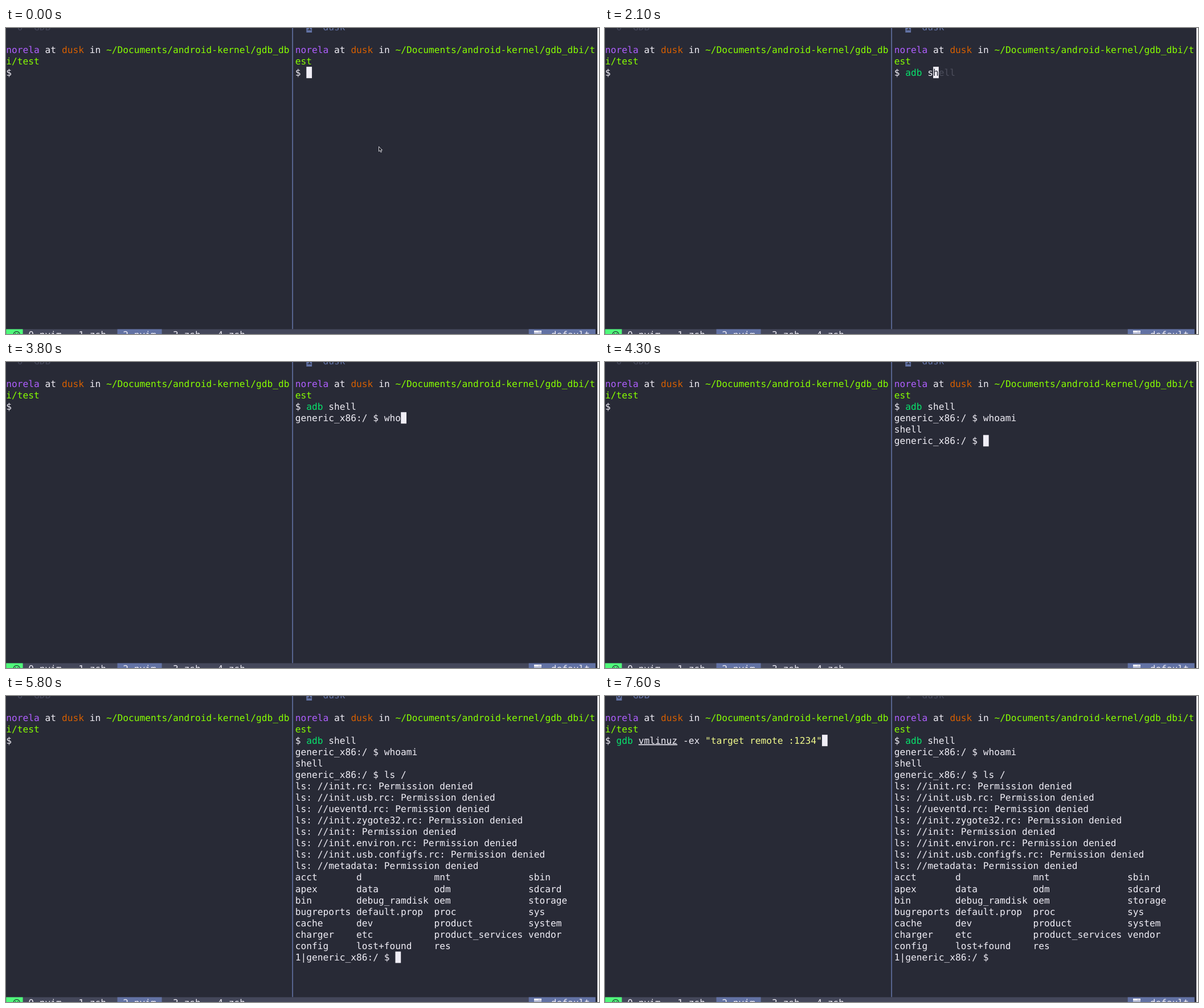
Recreate the animation shown at these times as an HTML page. Size 1041 px wide and 538 px high, loop 8 s.

```html
<!DOCTYPE html>
<html lang="en">
<head>
<meta charset="utf-8">
<title>Terminal session</title>
<style>
  html, body { margin: 0; width: 100%; height: 100%; overflow: hidden; background: #fff; }
  svg { position: absolute; left: 0; top: 0; }
  text {
    fill: #f0eef6; font: 16.21px "DejaVu Sans Mono", monospace; white-space: pre;
    text-rendering: geometricPrecision; font-variant-ligatures: none;
  }
  .user { fill: #af5fff; }
  .host { fill: #d75f00; }
  .path { fill: #87ff00; }
  .ok { fill: #08e36c; }
  .bad { fill: #ee4fb2; font-weight: bold; }
  .str { fill: #f1fa8c; }
  .file { text-decoration: underline; text-decoration-thickness: 1px; text-underline-offset: 2px; }
  .ghost { fill: #4d4f5d; }
  .cur, .num { fill: #282a36; }
  .on { fill: #6272a4; }
  .off { fill: #44475a; }
</style>
</head>
<body>
<svg width="1041" height="538">
  <path fill="#282a36" d="M0 0h1038.2v538H0z"/>
  <path fill="#6272a4" d="M502.3 0h1.6v529.5h-1.6z"/>
  <g id="bar"></g>
  <g fill="none" stroke="#282a36" stroke-width="1.1">
    <circle cx="18.7" cy="539.2" r="5.6"/>
    <path d="M16.6 536.5v2M20.8 536.5v2"/>
  </g>
  <path fill="#f0eef6" d="M927 532h13v4h-13zM927 537h13v1h-13z"/>
  <path fill="#6272a4" d="M935 533.4h1v1h-1zM937.3 533.4h1v1h-1z"/>
  <g id="panes"></g>
  <path id="mouse" d="M.5.5V9L2.5 7.2 4 10.5 5.4 9.8 4 6.7H6.6Z" fill="#17181f" stroke="#e4e4ea" stroke-width=".9"/>
</svg>
<script>
const LOOP = 8000;
const CELL = 9.7594, LINE = 20.061, X0 = 0.3, Y0 = -12.09, BASE = 15.6;
const LEFT = 0, RIGHT = 52;
const [bar, panes, mouse] = ['bar', 'panes', 'mouse'].map(id => document.getElementById(id));
const boxes = { cur: '#f0eef6', num: '#6272a4' };

const seg = (cls, s) => ({ cls, s });
const plain = s => seg('fg', s);
const cursor = (ch = ' ') => seg('cur', ch);

const x = col => (X0 + col * CELL).toFixed(3);
const y = line => Y0 + line * LINE;
const box = (col, line, cells, fill) =>
  `<rect x="${x(col)}" y="${y(line).toFixed(3)}" width="${cells * CELL}" height="${LINE}" fill="${fill}"/>`;

// Segments laid one after another on the character grid.
function row(col, line, segs) {
  let out = '';
  for (const { cls, s } of segs) {
    if (boxes[cls]) out += box(col, line, s.length, boxes[cls]);
    if (s.trim()) out += `<text class="${cls}" x="${x(col)}" y="${(y(line) + BASE).toFixed(3)}">${s}</text>`;
    col += s.length;
  }
  return out;
}

const title = (n, name, active) => active
  ? [plain('  '), seg('num', n), plain('  '), seg('on', name)]
  : [seg('off', `  ${n}  ${name}`)];
const prompt = path =>
  [seg('user', 'norela'), plain(' at '), seg('host', 'dusk'), plain(' in '), seg('path', path)];

// Command line with highlighting, cursor and history suggestion.
function typing(cmd, n) {
  const typed = cmd.slice(0, n);
  const head = n < 3 ? [seg('bad', typed)] : [seg('ok', typed.slice(0, 3)), plain(typed.slice(3))];
  return [plain('$ '), ...head, cursor(cmd[n]), seg('ghost', cmd.slice(n + 1))];
}

const ADB = 'adb shell';
const GDB = 'gdb vmlinuz -ex "target remote :1234"';
const PS = 'generic_x86:/ $ ';
const denied = ['init.rc', 'init.usb.rc', 'ueventd.rc', 'init.zygote32.rc', 'init',
  'init.environ.rc', 'init.usb.configfs.rc', 'metadata'].map(f => `ls: //${f}: Permission denied`);
const listing = [
  'acct d mnt sbin', 'apex data odm sdcard', 'bin debug_ramdisk oem storage',
  'bugreports default.prop proc sys', 'cache dev product system',
  'charger etc product_services vendor', 'config lost+found res'
].map(s => s.split(' ').map((w, i) => w.padEnd([11, 14, 17, 0][i])).join(''));

// Latest entry [time, value] at or before t.
const at = (list, t) => list.reduce((v, [time, val]) => t >= time ? val : v, list[0][1]);

const adbKeys = [[0, 0], [1700, 1], [1800, 2], [1900, 3], [2000, 4], [2100, 5], [2200, 6], [2300, 7], [2400, 9]];
const whoKeys = [[0, 0], [2900, 1], [3600, 2], [3800, 3], [3900, 5], [4100, 6]];
const lsKeys = [[0, 0], [5300, 2], [5500, 4]];
const gdbKeys = [[0, 0], [7100, 1], [7300, 2], [7400, 4], [7600, GDB.length]];
const mousePos = [[0, [654, 208]], [200, [660, 204]], [300, [668, 198]], [400, [674, 194]]];

function shell(t) {
  if (t < 1700) return [[plain('$ '), cursor()]];
  if (t < 2700) return [typing(ADB, at(adbKeys, t))];
  const out = [[plain('$ '), seg('ok', 'adb'), plain(' shell')]];
  const add = (...lines) => out.push(...lines.map(s => [plain(s)]));
  const input = s => out.push([plain(s), cursor()]);
  if (t < 4300) {
    input(PS + 'whoami'.slice(0, at(whoKeys, t)));
    return out;
  }
  add(PS + 'whoami', 'shell');
  if (t < 5800) {
    input(PS + 'ls /'.slice(0, at(lsKeys, t)));
    return out;
  }
  add(PS + 'ls /', ...denied, ...listing);
  (t < 6300 ? input : add)('1|' + PS);
  return out;
}

function debug(t) {
  if (t < 6300) return [plain('$')];
  if (t < 7100) return [plain('$ '), cursor()];
  if (t < 7600) return typing(GDB, at(gdbKeys, t));
  return [plain('$ '), seg('ok', 'gdb'), plain(' '), seg('file', 'vmlinuz'), plain(' -ex '),
    seg('str', '"target remote :1234"'), cursor()];
}

function screen(t) {
  const left = t >= 6300;
  const pane = (col, lines) => lines.map((segs, i) => row(col, i, segs)).join('');
  return pane(LEFT, [title('0', 'GDB', left), [], prompt('~/Documents/android-kernel/gdb_db'),
      [seg('path', 'i/test')], debug(t)])
    + pane(RIGHT, [title('1', 'dusk', !left), [], prompt('~/Documents/android-kernel/gdb_dbi/t'),
      [seg('path', 'est')], ...shell(t)]);
}

const STATUS = 27;
bar.innerHTML = box(0, STATUS, 106, '#44475a') + box(0, STATUS, 3, '#50fa7b')
  + box(20, STATUS, 8, '#6272a4') + box(94, STATUS, 12, '#6272a4')
  + [[4, '0 nvim'], [13, '1 zsh'], [21, '2 nvim'], [30, '3 zsh'], [38, '4 zsh'], [98, 'default']]
    .map(([col, s]) => row(col, STATUS, [plain(s)])).join('');

let shown = '';
function draw(now) {
  const t = now % LOOP;
  const html = screen(t);
  if (html !== shown) panes.innerHTML = shown = html;
  const visible = t < 1700 || (t >= 2900 && t < 3000) || (t >= 3500 && t < 3600);
  mouse.setAttribute('transform', `translate(${at(mousePos, t)})`);
  mouse.setAttribute('visibility', visible ? 'visible' : 'hidden');
}

const start = performance.now();
function tick() {
  draw(performance.now() - start);
  requestAnimationFrame(tick);
}
tick();
</script>
</body>
</html>
```
